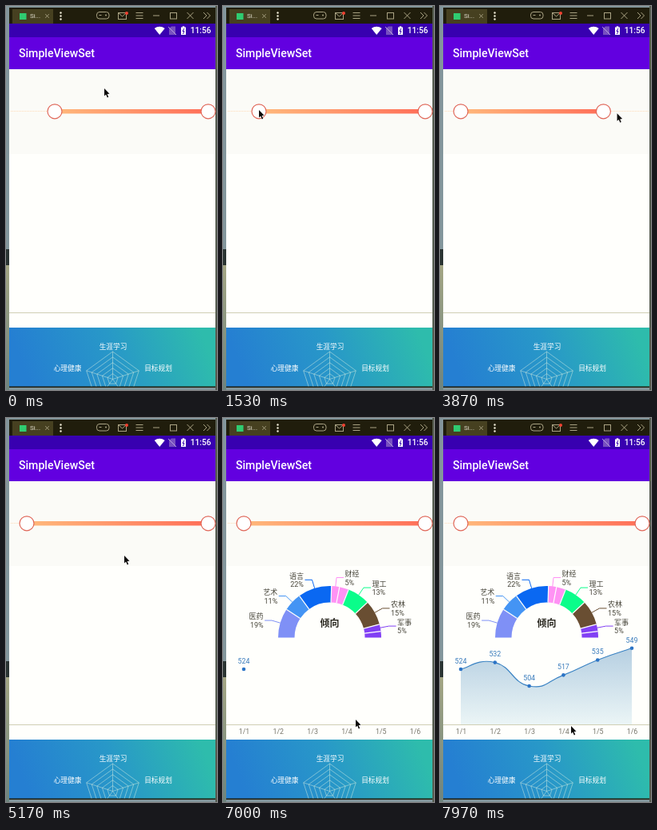
An HTML page with a canvas for the animation above (8 s loop, 264 by 480 pixels).

```html
<!DOCTYPE html>
<html lang="zh">
<head>
<meta charset="utf-8">
<title>SimpleViewSet</title>
<style>
html, body { margin: 0; width: 100%; height: 100%; overflow: hidden; background: #fdfdfb; }
canvas { display: block; width: 264px; height: 480px; }
</style>
</head>
<body>
<canvas id="stage"></canvas>
<script>
const W = 264, H = 480, LOOP = 8000;
const LEFT = 4, RIGHT = 262, WIDTH = RIGHT - LEFT;
const canvas = document.getElementById('stage');
const dpr = window.devicePixelRatio || 1;
canvas.width = W * dpr;
canvas.height = H * dpr;
const c = canvas.getContext('2d');
c.scale(dpr, dpr);

const LATIN = 'Roboto, "Noto Sans CJK SC", "Noto Sans CJK", sans-serif';
const HAN = '"Noto Sans CJK SC", "Noto Sans CJK", sans-serif';

const clamp = (v, lo, hi) => Math.min(hi, Math.max(lo, v));
const ease = p => 0.5 - Math.cos(Math.PI * clamp(p, 0, 1)) / 2;

function rect(x, y, w, h, fill) {
  c.fillStyle = fill;
  c.fillRect(x, y, w, h);
}
function path(points, close) {
  c.beginPath();
  points.forEach(([x, y]) => c.lineTo(x, y));
  if (close) c.closePath();
}
function stroke(color, width = 1) {
  c.strokeStyle = color;
  c.lineWidth = width;
  c.stroke();
}
function line(points, color, width, close) {
  path(points, close);
  stroke(color, width);
}
function poly(points, fill) {
  path(points, true);
  c.fillStyle = fill;
  c.fill();
}
function disc(x, y, r, fill) {
  c.beginPath();
  c.arc(x, y, r, 0, 7);
  c.fillStyle = fill;
  c.fill();
}
function text(s, x, y, font, fill, align = 'center') {
  c.font = font;
  c.fillStyle = fill;
  c.textAlign = align;
  c.textBaseline = 'middle';
  c.fillText(s, x, y);
}
function gradient(x0, y0, x1, y1, ...colors) {
  const g = c.createLinearGradient(x0, y0, x1, y1);
  colors.forEach((color, i) => g.addColorStop(i / (colors.length - 1), color));
  return g;
}
function clipped(x, y, w, h, paint) {
  c.save();
  c.beginPath();
  c.rect(x, y, w, h);
  c.clip();
  paint();
  c.restore();
}

// Pointer moves: start, end, x, y.
const MOVES = [
  [30, 200, 117, 106],
  [500, 1300, 61, 130],
  [1330, 1530, 45, 130],
  [1530, 1720, 24, 131],
  [2170, 2850, 253, 132],
  [2880, 2970, 217, 135],
  [3000, 3500, 150, 135],
  [3500, 4100, 255, 134],
  [4370, 4700, 148, 172],
  [5250, 5500, 138, 219],
  [6200, 6630, 166, 377],
  [7830, 7970, 164, 385]
];
const PIE_START = 5380, CHART_START = 7000, REVEAL = 800;

function pointer(t) {
  let x = 123, y = 103;
  for (const [start, end, toX, toY] of MOVES) {
    const p = ease((t - start) / (end - start));
    x += (toX - x) * p;
    y += (toY - y) * p;
  }
  return [x, y];
}

function drawWindow() {
  rect(0, 0, W, H, '#83969c');
  rect(0, 304, LEFT, 20, '#2a3432');
  rect(0, 324, LEFT, 156, gradient(0, 324, 0, H, '#a4a684', '#6e847e'));
  rect(RIGHT, 0, 2, H, '#555c50');
  rect(LEFT, 2, WIDTH, 475, '#201d0c');
  rect(8, 4, 51, 18, '#464020');
  rect(17, 9, 8.5, 8, '#2fcc71');
  text('Si...', 30, 13, '8px ' + LATIN, '#e6e2d4', 'left');

  const tone = '#aaa384';
  const cross = (x, y, r) => [-1, 1].forEach(s => line([[x - r, y - r * s], [x + r, y + r * s]], tone));
  cross(51.5, 12.5, 2.2);
  cross(230.5, 12, 4);
  for (let i = -1; i <= 1; i++) {
    disc(68.5, 12.5 + i * 4, 1.2, '#f0ecd8');
    line([[162.5, 12 + i * 3.5], [171.5, 12 + i * 3.5]], tone);
  }
  c.beginPath();
  c.roundRect(113.5, 7.5, 15.5, 8.5, 3.5);
  stroke(tone);
  line([[116.5, 11.5], [119.5, 11.5]], tone);
  disc(125, 11.5, 1, tone);

  c.strokeRect(140.5, 8.5, 10, 8);
  line([[140.5, 8.5], [145.5, 13], [150.5, 8.5]], tone);
  disc(151, 9, 2, '#f04030');
  line([[184, 12], [192, 12]], tone);
  c.strokeRect(205.5, 8.5, 8, 7.5);
  [247, 251.5].forEach(x => line([[x, 8], [x + 4, 12], [x, 16]], tone));
}

function drawBars() {
  rect(LEFT, 22, WIDTH, 17, '#3800b0');
  rect(LEFT, 39, WIDTH, 40, '#6200e0');
  c.beginPath();
  c.moveTo(192.2, 36);
  c.arc(192.2, 36, 10.3, -2.25, -0.89);
  c.fillStyle = '#fff';
  c.fill();
  poly([[204, 28], [207, 25.5], [212, 25.5], [212, 36], [204, 36]], '#7750c0');
  line([[203, 26], [213, 36]], '#b7a0dc');
  rect(219, 26.5, 6, 9.5, '#fff');
  rect(220.7, 25.3, 2.6, 1.5, '#fff');
  line([[223, 28], [221, 31.5], [223, 31.5], [221.5, 35]], '#3800b0');
  text('11:56', 256.5, 31, '500 10.2px ' + LATIN, '#fff', 'right');
  text('SimpleViewSet', 16, 59.7, '500 14.1px ' + LATIN, '#fff', 'left');
}

function drawSlider(t) {
  const y = 131.5, min = 26, max = 253, lag = 64;
  const a = t < 1330 ? 61 : t < 1720 ? clamp(pointer(t)[0], min, 61) : min;
  const dragRight = t > 2850 + lag && t < 4300;
  const b = dragRight ? clamp(pointer(t - lag)[0], a, max) : max;
  c.setLineDash([1, 1]);
  line([[6, y], [RIGHT, y]], '#ffdcb8');
  c.setLineDash([]);
  rect(a, 129, b - a, 5.5, gradient(a, 0, b, 0, '#ffb97c', '#ff6e58'));
  for (const x of [a, b]) {
    disc(x, y + 0.3, 9, '#fff');
    stroke('#e0685a', 1.2);
  }
}

// Slices: sweep in degrees, colour, name, share.
const SLICES = [
  [33, '#7f90f6', '医药', '19%'],
  [21, '#4494f4', '艺术', '11%'],
  [38, '#0a68f2', '语言', '22%'],
  [9, '#ff92f4', '财经', '5%'],
  [10.5, '#ff92f4'],
  [25.5, '#0afd8a', '理工', '13%'],
  [28, '#694e32', '农林', '15%'],
  [8, '#8240f4', '军事', '5%'],
  [7, '#8240f4']
];

function drawPie(t) {
  if (t < PIE_START) return;
  const sweep = 180 * ease((t - PIE_START) / REVEAL);
  const x = 133.5, y = 274.5, r = 64.5, inner = 44, ink = '#47453a';
  const rad = d => (d + 180) * Math.PI / 180;
  const at = (d, len) => [x + Math.cos(rad(d)) * len, y + Math.sin(rad(d)) * len];
  let from = 0;
  for (const [size, color, name, share] of SLICES) {
    if (sweep <= from + 0.5) break;
    const mid = from + size / 2, end = Math.min(from + size, sweep);
    c.beginPath();
    c.arc(x, y, r, rad(from), rad(end));
    c.arc(x, y, inner, rad(end), rad(from), true);
    c.fillStyle = color;
    c.fill();
    if (from) line([at(from, inner), at(from, r)], '#fdfdfd', 1.2);
    if (name && sweep >= mid) {
      const side = mid < 90 ? -1 : 1;
      const [ex, ey] = at(mid, r + 11);
      line([[ex + side * 9, ey], [ex, ey], at(mid, r)], color);
      const align = side < 0 ? 'right' : 'left';
      text(name, ex + side * 10.5, ey - 5, '9px ' + HAN, ink, align);
      text(share, ex + side * 10.5, ey + 6.5, '9px ' + LATIN, ink, align);
    }
    from += size;
  }
  text('倾向', 133.5, 256, 'bold 12px ' + HAN, '#2a2820');
}

const VALUES = [524, 532, 504, 517, 535, 549];
const POINTS = VALUES.map((v, i) => [26 + i * 42.8, 314 - (v - VALUES[0]) * 1.05]);

// Smooth curve whose tangents follow the neighbouring points.
function curve(points) {
  const k = 0.25, last = points.length - 1;
  const tangent = i => {
    const a = points[Math.max(0, i - 1)], b = points[Math.min(last, i + 1)];
    return [(b[0] - a[0]) * k, (b[1] - a[1]) * k];
  };
  c.beginPath();
  c.moveTo(...points[0]);
  for (let i = 0; i < last; i++) {
    const [x0, y0] = points[i], [x1, y1] = points[i + 1];
    const [dx0, dy0] = tangent(i), [dx1, dy1] = tangent(i + 1);
    c.bezierCurveTo(x0 + dx0, y0 + dy0, x1 - dx1, y1 - dy1, x1, y1);
  }
}

function drawChart(t) {
  const base = 383;
  line([[LEFT, base + 0.5], [RIGHT, base + 0.5]], '#d0cfb4');
  if (t < CHART_START) return;
  const steps = Math.floor(ease((t - CHART_START) / REVEAL) * (POINTS.length - 1));
  const shown = POINTS.slice(0, steps + 1);
  curve(shown);
  c.lineTo(shown[steps][0], base);
  c.lineTo(shown[0][0], base);
  c.fillStyle = gradient(0, 290, 0, base, '#b7d0e2', '#ebf5f6');
  c.fill();
  curve(shown);
  stroke('#3c84c4', 1.2);
  POINTS.forEach(([x, y], i) => {
    text('1/' + (i + 1), x + 0.5, 392.5, '8.8px ' + LATIN, '#77756a');
    if (i > steps) return;
    disc(x, y, 2.3, '#2c74c6');
    text(VALUES[i], x, y - 9.7, '8.8px ' + LATIN, '#3a7cbc');
  });
}

function drawRadar() {
  const top = 402, height = 73.5, tone = 'rgba(220,240,225,.6)';
  rect(LEFT, top, WIDTH, height, gradient(30, 475, 240, 395, '#257fd2', '#2898c8', '#2ebcac'));
  const corner = (i, r) => {
    const a = (i * 0.4 - 0.5) * Math.PI;
    return [133.5 + Math.cos(a) * r, 466.5 + Math.sin(a) * r];
  };
  clipped(LEFT, top, WIDTH, height, () => {
    for (let i = 0; i < 5; i++) {
      const r = (i + 1) * 6.9;
      line([0, 1, 2, 3, 4].map(n => corner(n, r)), tone, 0.8, true);
      line([corner(i, 0), corner(i, 34.5)], tone, 0.8);
    }
  });
  const label = (s, x, y) => text(s, x, y, '8.7px ' + HAN, '#fff');
  label('生涯学习', 134, 425.5);
  label('心理健康', 77, 452.5);
  label('目标规划', 190.5, 452.5);
}

function drawCursor(t) {
  const [x, y] = pointer(t);
  const shape = [[0, 0], [0, 9.5], [2.1, 7.6], [3.8, 11.4], [5.2, 10.7], [3.6, 7.1], [6.5, 6.8]]
    .map(([dx, dy]) => [x + dx, y + dy]);
  line(shape, 'rgba(255,255,255,.7)', 1, true);
  poly(shape, '#0c0a08');
}

function draw(t) {
  drawWindow();
  drawBars();
  rect(LEFT, 79, WIDTH, 106, '#fbfbf7');
  rect(LEFT, 185, WIDTH, 217, '#fffffc');
  drawSlider(t);
  drawPie(t);
  drawChart(t);
  drawRadar();
  drawCursor(t);
}

const begin = performance.now();
function tick() {
  draw((performance.now() - begin) % LOOP);
  requestAnimationFrame(tick);
}
tick();
</script>
</body>
</html>
```
